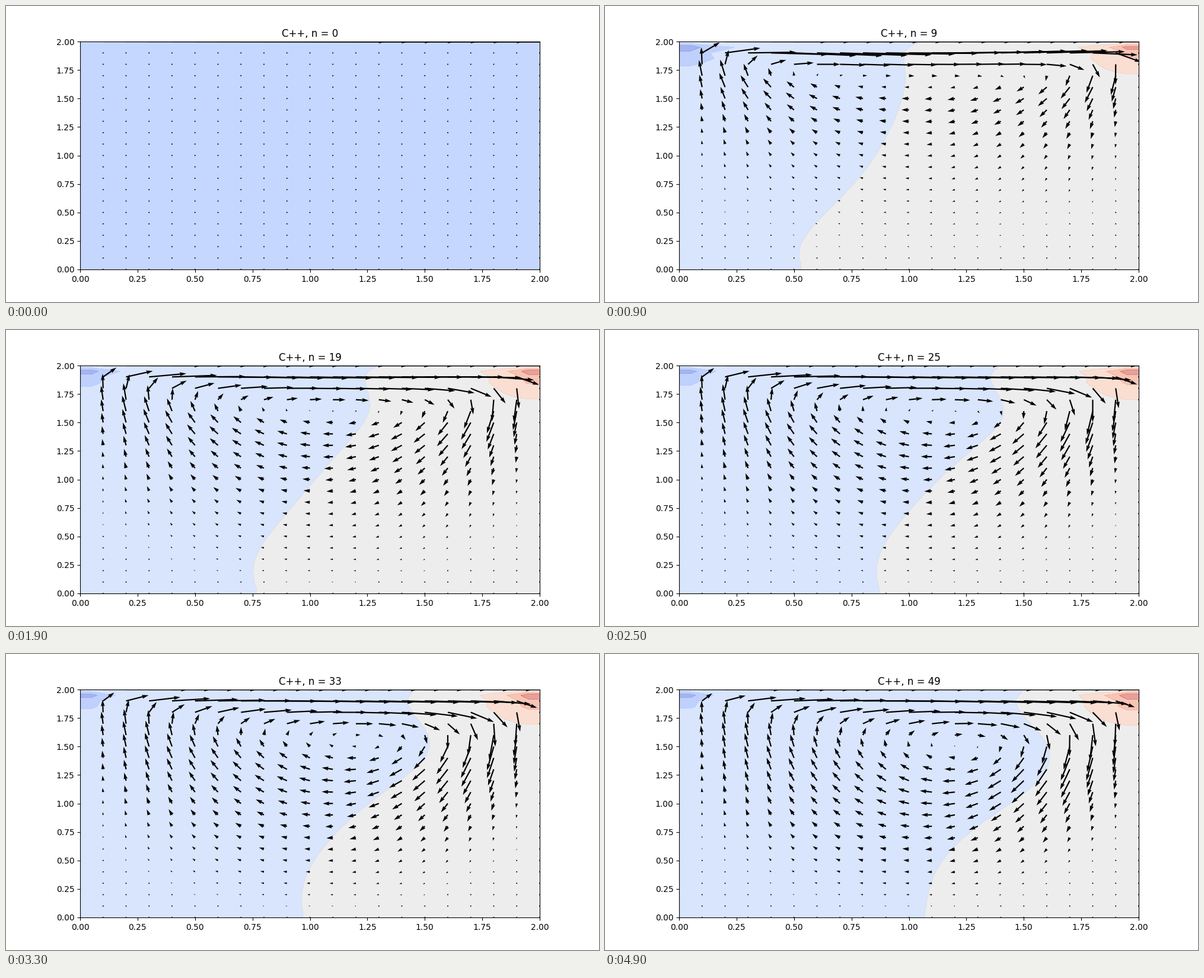
A matplotlib script for the animation above (5000 ms loop, 1000x500 px).

```python
import numpy as np
import matplotlib.pyplot as plt
from matplotlib.animation import FuncAnimation

# Lid-driven cavity flow, solved with finite differences
N = 41
FRAMES, STEPS_PER_FRAME, P_ITERS = 50, 10, 50
H = 2 / (N - 1)
DT, RHO, NU = 0.01, 1.0, 0.02

axis = np.linspace(0, 2, N)
X, Y = np.meshgrid(axis, axis)


def ddx(f):
    return (f[1:-1, 2:] - f[1:-1, :-2]) / (2 * H)


def ddy(f):
    return (f[2:, 1:-1] - f[:-2, 1:-1]) / (2 * H)


def neighbours(f):
    return f[1:-1, 2:] + f[1:-1, :-2] + f[2:, 1:-1] + f[:-2, 1:-1]


def solve_pressure(u, v, p):
    ux, uy, vx, vy = ddx(u), ddy(u), ddx(v), ddy(v)
    b = RHO * ((ux + vy) / DT - ux**2 - 2 * uy * vx - vy**2)
    for _ in range(P_ITERS):
        p[1:-1, 1:-1] = (neighbours(p) - b * H**2) / 4
        p[:, -1] = p[:, -2]
        p[0] = p[1]
        p[:, 0] = p[:, 1]
        p[-1] = 0


def advance(f, u, v, grad_p):
    c = f[1:-1, 1:-1]
    new = f.copy()
    new[1:-1, 1:-1] = (
        c
        - u[1:-1, 1:-1] * DT / H * (c - f[1:-1, :-2])
        - v[1:-1, 1:-1] * DT / H * (c - f[:-2, 1:-1])
        - DT / RHO * grad_p
        + NU * DT / H**2 * (neighbours(f) - 4 * c)
    )
    return new


def simulate():
    u, v, p = (np.zeros((N, N)) for _ in range(3))
    states = []
    for step in range((FRAMES - 1) * STEPS_PER_FRAME + 1):
        solve_pressure(u, v, p)
        u, v = advance(u, u, v, ddx(p)), advance(v, u, v, ddy(p))
        u[-1] = 1
        u[0] = u[:, 0] = u[:, -1] = 0
        v[0] = v[-1] = v[:, 0] = v[:, -1] = 0
        if step % STEPS_PER_FRAME == 0:
            states.append((u.copy(), v.copy(), p.copy()))
    return states


states = simulate()
fig, ax = plt.subplots(figsize=(10, 5), dpi=100)


def draw(n):
    u, v, p = states[n]
    s = (slice(None, None, 2),) * 2
    ax.clear()
    ax.contourf(X, Y, p, alpha=0.5, cmap=plt.cm.coolwarm)
    ax.quiver(X[s], Y[s], u[s], v[s])
    ax.set_xlim(0, 2)
    ax.set_ylim(0, 2)
    ax.set_title(f"C++, n = {n}")
    return []


anim = FuncAnimation(fig, draw, frames=FRAMES, interval=100, repeat=True)
plt.show()
```
